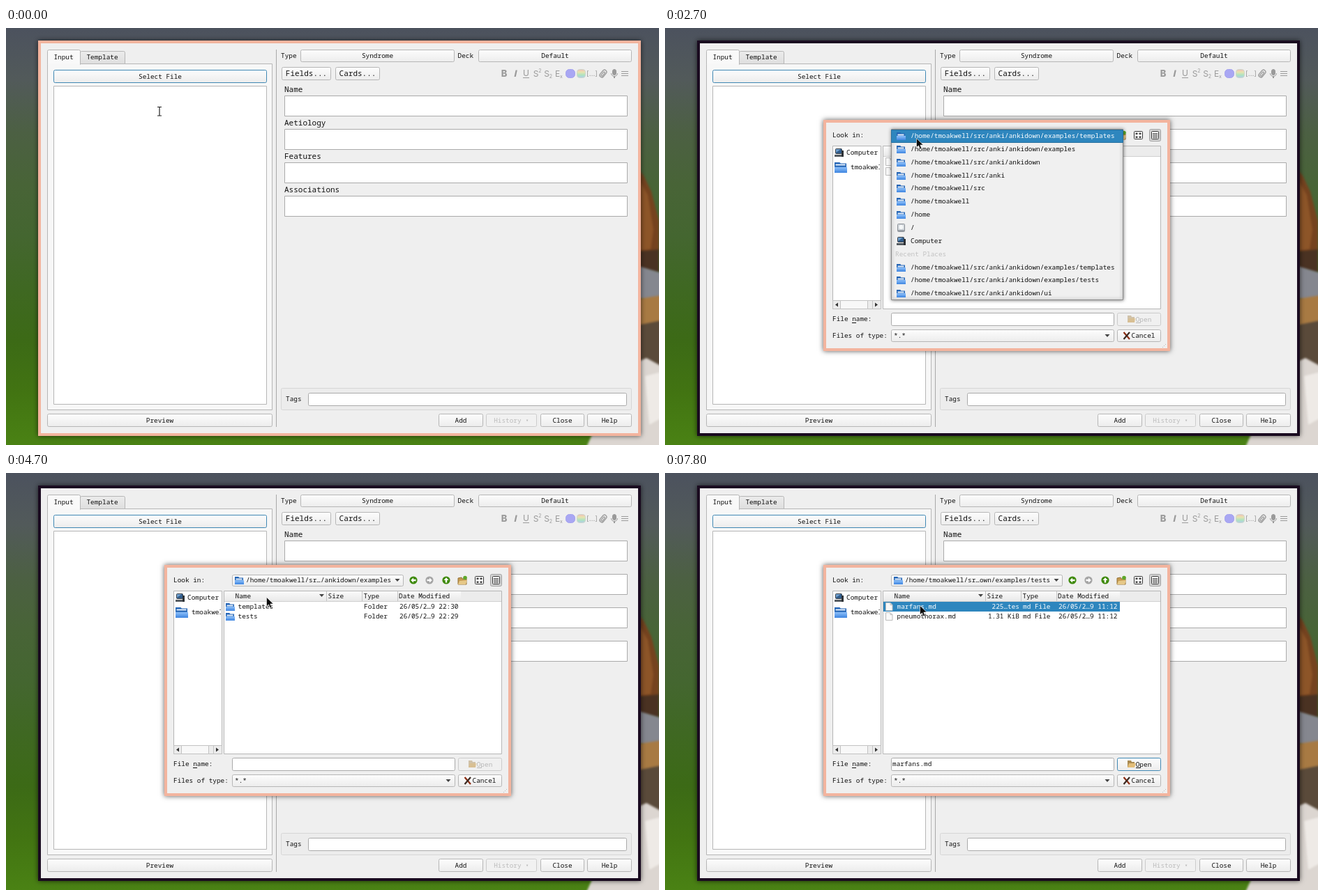
An HTML page with a canvas that plays this animation: 936x599 px, repeating every 8 s.

```html
<!DOCTYPE html>
<html lang="en">
<head>
<meta charset="utf-8">
<title>Import dialog</title>
<style>
html, body { margin: 0; width: 100%; height: 100%; overflow: hidden; background: #45672c; }
canvas { display: block; }
</style>
</head>
<body>
<canvas id="stage" width="936" height="599"></canvas>
<script>
const ctx = document.getElementById('stage').getContext('2d');
const MONO = '"Noto Sans Mono", "DejaVu Sans Mono", monospace';
const SMALL = 9.4, BIG = 11;
const BLUE = '#2e86be', PINK = '#f3b49e', DARK = '#1a0b20', PANEL = '#efefef', LINE = '#b6b6b6';
const LOOP = 8000, TICK = 100;
const HOME = '/home/tmoakwell';
const ROOT = HOME + '/src/anki/ankidown';

// Pointer moves: start time, number of ticks, end point.
const MOVES = [
  [400, 6, 211, 71], [1300, 6, 360, 158], [3000, 4, 373, 178],
  [5100, 4, 360, 205], [7000, 2, 363, 196], [7300, 3, 365, 190]
];

const PLACES = [
  ['folder', ROOT + '/examples/templates'], ['folder', ROOT + '/examples'], ['folder', ROOT],
  ['folder', HOME + '/src/anki'], ['folder', HOME + '/src'], ['folder', HOME], ['folder', '/home'],
  ['drive', '/'], ['computer', 'Computer'], ['', 'Recent Places'],
  ['folder', ROOT + '/examples/templates'], ['folder', ROOT + '/examples/tests'], ['folder', ROOT + '/ui']
];

const LISTS = {
  templates: {
    path: HOME + '/sr…examples/templates',
    rows: [['file', 'condition.md', '434…tes', 'md File', '22:30'], ['file', 'syndrome.md', '88 bytes', 'md File', '11:12']]
  },
  examples: {
    path: HOME + '/sr…/ankidown/examples',
    rows: [['folder', 'templates', '', 'Folder', '22:30'], ['folder', 'tests', '', 'Folder', '22:29']]
  },
  tests: {
    path: HOME + '/sr…own/examples/tests',
    rows: [['file', 'marfans.md', '225…tes', 'md File', '11:12'], ['file', 'pneumothorax.md', '1.31 KiB', 'md File', '11:12']]
  }
};

function fill(x, y, w, h, color) {
  ctx.fillStyle = color;
  ctx.fillRect(x, y, w, h);
}

function box(x, y, r, b, color, edge = LINE, radius = 0) {
  ctx.beginPath();
  ctx.roundRect(x + .5, y + .5, r - x - 1, b - y - 1, radius);
  ctx.fillStyle = color;
  ctx.fill();
  ctx.strokeStyle = edge;
  ctx.lineWidth = 1;
  ctx.stroke();
}

function vertical(y, b, ...colors) {
  const g = ctx.createLinearGradient(0, y, 0, b);
  colors.forEach((c, i) => g.addColorStop(i / (colors.length - 1), c));
  return g;
}

function text(s, x, y, { size = SMALL, color = '#111', align = 'left', weight = 400, font = MONO } = {}) {
  ctx.font = `${weight} ${size}px ${font}`;
  ctx.textAlign = align;
  ctx.fillStyle = color;
  ctx.fillText(s, x, y);
}

function button(s, x, y, r, b, { edge = LINE, face, color = '#111', size = SMALL, dx = 0 } = {}) {
  box(x, y, r, b, face || vertical(y, b, '#fdfdfd', '#ececec'), edge, 2);
  text(s, (x + r) / 2 + dx, Math.round((y + b) / 2 + 3), { align: 'center', color, size });
}

function poly(points, color, edge, width = 1) {
  ctx.beginPath();
  points.forEach(([x, y]) => ctx.lineTo(x, y));
  ctx.closePath();
  if (color) { ctx.fillStyle = color; ctx.fill(); }
  if (edge) { ctx.strokeStyle = edge; ctx.lineWidth = width; ctx.lineJoin = 'round'; ctx.stroke(); }
}

function stroke(points, color, width = 1) {
  ctx.beginPath();
  points.forEach(([x, y]) => ctx.lineTo(x, y));
  ctx.strokeStyle = color;
  ctx.lineWidth = width;
  ctx.stroke();
}

function disc(x, y, r, color) {
  ctx.beginPath();
  ctx.arc(x, y, r, 0, 7);
  ctx.fillStyle = color;
  ctx.fill();
}

function down(x, y, color = '#444') {
  poly([[x - 3.5, y - 2], [x + 3.5, y - 2], [x, y + 2]], color);
}

function withShadow(blur, color, draw) {
  ctx.save();
  ctx.shadowBlur = blur;
  ctx.shadowColor = color;
  draw();
  ctx.restore();
}

function wallpaper() {
  fill(0, 0, 936, 599, vertical(0, 599, '#4c525e', '#525a5a', '#4c6043', '#486437', '#446630', '#3f6822', '#3c6a16', '#427412', '#4a8214'));
  ctx.save();
  ctx.filter = 'blur(1.5px)';
  poly([[900, 196], [914, 212], [925, 235], [936, 277], [936, 320], [922, 324], [900, 322]], '#75431f');
  poly([[904, 212], [920, 240], [928, 290], [924, 318], [904, 320]], '#8d5528');
  poly([[900, 322], [936, 318], [936, 352], [900, 344]], '#4a3222');
  poly([[900, 340], [940, 352], [940, 398], [900, 386]], '#85878f');
  poly([[900, 390], [940, 384], [940, 424], [900, 432]], '#a87a43');
  poly([[900, 428], [940, 420], [940, 488], [900, 482]], '#5a4a3a');
  poly([[900, 482], [918, 474], [940, 486], [940, 602], [832, 602], [840, 584], [900, 570]], '#dcd6d1');
  poly([[916, 500], [940, 494], [940, 560], [922, 570]], '#eeeae6');
  ctx.restore();
}

function frame(x, y, r, b, color) {
  withShadow(7, 'rgba(0,0,0,.65)', () => fill(x, y, r - x, b - y, color));
  fill(x + 4, y + 4, r - x - 8, b - y - 8, PANEL);
}

function toolbar() {
  const gray = '#9a9a9a', font = 'Inter, "Open Sans", sans-serif';
  const glyph = (s, x, y, size, weight = 400) => text(s, x, y, { size, weight, color: gray, align: 'center', font });
  glyph('B', 714, 70, 13, 800);
  ctx.save();
  ctx.translate(730, 0);
  ctx.transform(1, 0, -.22, 1, 15, 0);
  glyph('I', 0, 70, 13, 800);
  ctx.restore();
  glyph('U', 745.5, 69, 12);
  fill(741, 71, 9, 1, gray);
  glyph('S', 759.5, 70, 12);
  glyph('2', 765.5, 64, 7);
  glyph('S', 775, 70, 12);
  glyph('2', 781, 72, 7);
  glyph('E', 790.5, 70, 12);
  glyph('x', 796, 72, 7);
  box(802, 59, 816, 72, '#a9a7f3', '#a3a1ee', 5);
  const g = vertical(59, 72, '#f3b9b9', '#e8e3af', '#aee3c0', '#b3c9f0');
  box(818, 59, 831, 72, g, '#ccd6cc', 4);
  glyph('[…]', 840, 69, 10);
  ctx.save();
  ctx.translate(856, 65.5);
  ctx.rotate(.7);
  ctx.strokeStyle = gray;
  ctx.lineWidth = 1.3;
  ctx.beginPath();
  ctx.roundRect(-3, -6, 6, 12, 3);
  ctx.roundRect(-1, -3, 2.4, 7, 1);
  ctx.stroke();
  ctx.restore();
  box(869, 59, 875, 68, gray, gray, 3);
  ctx.beginPath();
  ctx.arc(872, 65, 4.5, 0, Math.PI);
  ctx.stroke();
  fill(871, 69, 2, 3, gray);
  for (const y of [62, 65, 68]) fill(882, y, 10, 1, gray);
}

function mainWindow(s) {
  frame(46, 18, 910, 586, s.dialog ? DARK : PINK);
  box(59, 51, 382, 549, '#f7f7f7');
  box(106, 33, 171, 52, vertical(33, 52, '#ececec', '#dedede'), LINE, [2, 2, 0, 0]);
  box(59, 31, 107, 53, '#f9f9f9', LINE, [2, 2, 0, 0]);
  fill(60, 51, 46, 3, '#f7f7f7');
  text('Input', 82.5, 45, { align: 'center' });
  text('Template', 138, 45, { align: 'center' });

  const face = s.pressed ? '#c9cdcf' : s.hover ? vertical(60, 79, '#fefefe', '#f6f6f6') : null;
  button('Select File', 68, 60, 374, 79, { edge: '#4088b4', face });
  box(68, 83, 374, 541, '#fff');
  button('Preview', 59, 554, 382, 573);
  fill(387, 31, 1, 542, '#a9a9a9');

  text('Type', 394, 43);
  button('Syndrome', 422, 31, 643, 49);
  text('Deck', 647.5, 43);
  button('Default', 677, 31, 897, 49);
  button('Fields...', 395, 56, 466, 75, { size: BIG });
  button('Cards...', 472, 56, 536, 75, { size: BIG });
  toolbar();
  ['Name', 'Aetiology', 'Features', 'Associations'].forEach((label, i) => {
    text(label, 399, 92 + 48 * i, { size: BIG });
    box(399, 97 + 48 * i, 891, 127 + 48 * i, '#fff', '#aaa');
  });

  box(394, 517, 897, 549, '#ececec', '#d6d6d6', 2);
  text('Tags', 401, 536);
  box(433, 524, 890, 543, '#fff', '#aaa', 2);
  button('Add', 620, 554, 684, 573);
  button('History ▾', 688, 554, 761, 573, { color: '#bbb', edge: '#ccc', face: '#f1f1f1' });
  button('Close', 766, 554, 829, 573);
  button('Help', 833, 554, 897, 573);
}

function folder(x, y, w = 13, h = 11) {
  poly([[x, y], [x + w * .4, y], [x + w * .5, y + 1.5], [x + w - 1, y + 1.5], [x + w - 1, y + h], [x, y + h]], '#2465b5');
  fill(x + 1.5, y + 2.5, w - 4, 2, '#e4effc');
  fill(x, y + h * .45, w, h * .55, vertical(y + h * .45, y + h, '#8fc1fa', '#3e85e0'));
}

function icon(kind, x, y) {
  if (kind === 'folder') folder(x, y - 5);
  if (kind === 'file') {
    poly([[x + 1.5, y - 5.5], [x + 8, y - 5.5], [x + 11, y - 2.5], [x + 11, y + 5.5], [x + 1.5, y + 5.5]], '#f8f8f8', '#bdbdbd');
    stroke([[x + 8, y - 5], [x + 8, y - 2.5], [x + 11, y - 2.5]], '#bdbdbd');
  }
  if (kind === 'drive') {
    box(x + 1, y - 6, x + 12, y + 6, '#d4d9de', '#8b9096', 1);
    disc(x + 6.5, y - 1, 3, '#f5f7f8');
    fill(x + 2, y + 3, 9, 2, '#9ba1a8');
  }
  if (kind === 'computer') {
    box(x + 1, y - 6, x + 11, y + 2, '#315d8c', '#3a3f44', 1);
    poly([[x + 2, y - 5], [x + 9, y - 5], [x + 2, y]], '#6f9fce');
    fill(x, y + 3, 11, 3, '#555b60');
    fill(x + 10, y - 3, 3, 9, '#2e3236');
  }
}

function navArrow(x, angle, color) {
  disc(x, 154, 5.6, color);
  ctx.save();
  ctx.translate(x, 154);
  ctx.rotate(angle);
  poly([[-3.8, 0], [0, -3.5], [0, -1.2], [3.5, -1.2], [3.5, 1.2], [0, 1.2], [0, 3.5]], '#fff');
  ctx.restore();
}

function navBar(s) {
  const green = '#3f8a0c', gray = '#a5a5a5';
  text('Look in:', 240, 157);
  box(324, 146, 570, 163, vertical(146, 163, '#fdfdfd', '#ececec'), LINE, 2);
  folder(328, 149);
  text(s.list.path, 344, 157);
  down(561, 154);
  navArrow(584, 0, s.back ? green : gray);
  navArrow(607, Math.PI, gray);
  navArrow(631, Math.PI / 2, green);
  poly([[648, 151], [653, 150], [654, 152], [660, 152], [660, 160], [648, 160]], '#c49a50', '#957237');
  poly([[650, 155], [661, 154], [659, 160], [648, 160]], '#e6c888');
  disc(658, 150.5, 2.8, '#5ea72a');
  box(672, 148, 685, 160, '#fff', '#333', 1);
  for (const x of [674, 679]) for (const y of [150, 155]) fill(x + .5, y + .5, 3, 2.5, '#444');
  box(694, 145, 711, 163, '#d4d4d4', '#a0a0a0', 2);
  box(697, 148, 708, 160, '#fff', '#333', 1);
  for (const y of [151, 153, 155, 157]) fill(699, y, 7, 1, '#444');
}

function sidebar() {
  box(240, 169, 310, 404, '#fff');
  ctx.save();
  ctx.beginPath();
  ctx.rect(241, 170, 67, 220);
  ctx.clip();
  icon('computer', 243, 179);
  text('Computer', 260, 182);
  folder(243, 193, 18, 15);
  text('tmoakwell', 266, 203);
  ctx.restore();
  box(240, 391, 310, 404, '#ececec', '#c2c2c2');
  box(251, 391, 291, 404, '#f8f8f8', '#c2c2c2');
  fill(297, 392, 1, 11, '#c2c2c2');
  poly([[244, 397.5], [248, 394.5], [248, 400.5]], '#333');
  poly([[305, 397.5], [301, 394.5], [301, 400.5]], '#333');
}

function fileList(s) {
  box(312, 169, 711, 404, '#fff');
  fill(313, 170, 397, 14, '#ececec');
  fill(313, 170, 339, 14, vertical(170, 184, '#fafafa', '#e9e9e9'));
  fill(313, 184, 397, 1, '#cfcfcf');
  for (const x of [459, 510, 561]) fill(x, 170, 1, 14, '#c4c4c4');
  [['Name', 328.5], ['Size', 461.5], ['Type', 512.5], ['Date Modified', 563]].forEach(([h, x]) => text(h, x, 180));
  down(452.5, 176);
  s.list.rows.forEach(([kind, name, size, type, time], i) => {
    const y = 192 + 14 * i, on = i === s.selected;
    if (on) fill(313, y - 7, 339, 14, BLUE);
    const look = { color: on ? '#fff' : '#111', weight: on ? (kind === 'folder' ? 600 : 500) : 400 };
    icon(kind, 315, y);
    text(name, 332.5, y + 3, look);
    text(size, 508, y + 3, { ...look, align: 'right' });
    text(type, 513, y + 3, look);
    text('26/05/2…9 ' + time, 564, y + 3, look);
  });
}

function dialog(s) {
  frame(227, 132, 724, 464, PINK);
  navBar(s);
  sidebar();
  fileList(s);

  text('File name:', 240, 421);
  fill(268, 423, 6, 1, '#111');
  box(324, 409, 644, 428, '#fff', s.focus ? '#4088b4' : '#aaa', 2);
  text(s.name, 326, 421);
  const ready = s.selected >= 0;
  const ink = ready ? '#111' : '#b8b8b8';
  button('Open', 648, 409, 711, 428, { dx: 6.5, color: ink, edge: ready ? '#4088b4' : '#cbcbcb', face: ready ? null : '#f0f0f0' });
  fill(675, 423, 6, 1, ink);
  ctx.globalAlpha *= ready ? 1 : .45;
  poly([[663, 413], [668, 413], [669, 415], [673, 415], [673, 423], [663, 423]], '#a98a52');
  poly([[665, 417], [675, 417], [673, 423], [663, 423]], '#e2bd78');
  ctx.globalAlpha /= ready ? 1 : .45;

  text('Files of type:', 240, 445);
  box(324, 433, 644, 451, vertical(433, 451, '#fdfdfd', '#ececec'), LINE, 2);
  text('*.*', 328, 445);
  down(634, 442);
  button('Cancel', 648, 433, 711, 451, { dx: 6 });
  stroke([[657.5, 437], [666, 447]], '#8b2c12', 2.2);
  stroke([[666, 437], [657.5, 447]], '#3b2a22', 2.2);
  for (let i = 0; i < 3; i++) fill(717 - 2 * i, 454 + 2 * i, 1, 1, '#bbb');
}

function popup(s) {
  const body = () => box(324, 145, 657, 391, '#f0f0f0', '#8a8a8a');
  if (s.shadow) withShadow(5, 'rgba(0,0,0,.55)', body);
  else body();
  PLACES.forEach(([kind, label], i) => {
    const y = 155 + 18.85 * i, on = i === s.row;
    if (on) box(324, Math.round(y - 9.5), 657, Math.round(y + 9.5), BLUE, '#26709f');
    icon(kind, 332, Math.round(y));
    text(label, kind ? 352 : 330, Math.round(y + 3), { color: on ? '#fff' : kind ? '#111' : '#c2c2c2' });
  });
}

function pointerAt(t) {
  let x = 220, y = 120;
  for (const [start, count, nx, ny] of MOVES) {
    if (t < start) break;
    const p = Math.min(1, (t - start + TICK) / (count * TICK));
    const e = p * p * (3 - 2 * p);
    x += (nx - x) * e;
    y += (ny - y) * e;
  }
  return [Math.round(x), Math.round(y)];
}

function pointer(x, y) {
  if (y > 83 && x < 230) {
    const beam = [[x - 3, y - 6.5], [x + 3, y - 6.5], [x, y - 6.5], [x, y + 6], [x - 3, y + 6], [x + 3, y + 6]];
    stroke(beam, '#fff', 3);
    stroke(beam, '#222', 1.2);
    return;
  }
  const shape = [[0, 0], [0, 13], [3, 10.4], [5.2, 15.5], [7.4, 14.5], [5.3, 9.6], [9.6, 9.4]];
  poly(shape.map(([a, b]) => [x + a + .5, y + b + .5]), '#0a0a0a', 'rgba(245,245,245,.8)', .8);
}

function stateAt(t) {
  const [x, y] = pointerAt(t);
  return {
    x, y,
    hover: t < 1400 && y < 79,
    pressed: t >= 1200 && t < 1300,
    dialog: t < 1400 ? 0 : Math.min(1, (t - 1300) / 300),
    focus: t < 2400,
    list: LISTS[t < 4500 ? 'templates' : t < 6300 ? 'examples' : 'tests'],
    back: t >= 4500,
    popup: t < 2400 ? 0 : t < 4500 ? 1 : Math.max(0, (4700 - t) / 300),
    shadow: t >= 2700,
    row: y >= 165 ? 1 : 0,
    selected: t >= 7800 ? 0 : t >= 6000 && t < 6300 ? 1 : -1,
    name: t >= 7800 ? 'marfans.md' : ''
  };
}

function render(now) {
  const t = Math.floor((now % LOOP) / TICK) * TICK;
  const s = stateAt(t);
  wallpaper();
  mainWindow(s);
  if (s.dialog) {
    ctx.globalAlpha = s.dialog;
    dialog(s);
  }
  if (s.popup) {
    ctx.globalAlpha = s.popup;
    popup(s);
  }
  ctx.globalAlpha = 1;
  pointer(s.x, s.y);
}

const began = performance.now();
function loop() {
  render(performance.now() - began);
  requestAnimationFrame(loop);
}
loop();
</script>
</body>
</html>
```
